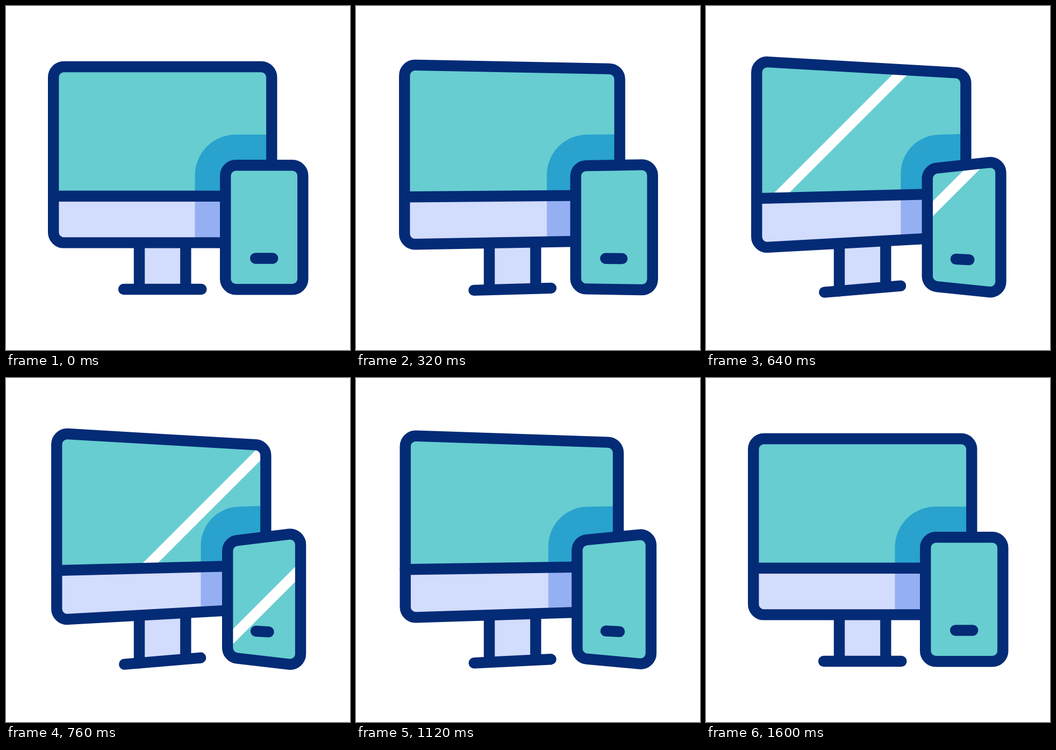
An HTML page with a canvas for the animation above (1.76 s loop, 640x640 px).

```html
<!DOCTYPE html>
<html lang="en">
<head>
<meta charset="utf-8">
<title>Computer and phone</title>
<style>
  html, body { margin: 0; width: 100%; height: 100%; overflow: hidden; background: #fff; }
  canvas { display: block; }
</style>
</head>
<body>
<canvas id="stage" width="640" height="640"></canvas>
<script>
const ctx = document.getElementById('stage').getContext('2d');
const LOOP = 1760, STEP = 40, RADIUS = 19.5;
const NAVY = '#042b76', TEAL = '#67cdd1', BLUE = '#29a2ce';
const LAVENDER = '#d2dcfd', SHADE = '#94b0f3';

const smooth = (t, start, length) => {
  const u = Math.min(1, Math.max(0, (t - start) / length));
  return u * u * (3 - 2 * u);
};

// Fake perspective: squeeze x towards a pivot, then scale heights linearly along x.
const turner = (k, { pivot, squeeze, axisX, axisY, tilt }) => (x, y) => {
  const tx = x + (pivot - x) * squeeze * k;
  return [tx, y + (y - axisY) * (tx - axisX) * tilt * k];
};

function polygon(...points) {
  const path = new Path2D();
  points.forEach(p => path.lineTo(...p));
  path.closePath();
  return path;
}

function rounded(corners) {
  const path = new Path2D();
  const [a, b] = corners;
  path.moveTo((a[0] + b[0]) / 2, (a[1] + b[1]) / 2);
  for (let i = 1; i <= 4; i++) path.arcTo(...corners[i % 4], ...corners[(i + 1) % 4], RADIUS);
  path.closePath();
  return path;
}

const box = (turn, left, top, right, bottom) =>
  [turn(left, top), turn(right, top), turn(right, bottom), turn(left, bottom)];

function fill(path, color) {
  ctx.fillStyle = color;
  ctx.fill(path);
}

function line(from, to) {
  ctx.beginPath();
  ctx.moveTo(...from);
  ctx.lineTo(...to);
  ctx.stroke();
}

// Diagonal white band whose left edge satisfies x + y = sum.
function shine(sum) {
  fill(polygon([sum, 0], [sum + 28, 0], [sum - 612, 640], [sum - 640, 640]), '#fff');
}

function drawStand(k) {
  const turn = turner(k, { pivot: 0, squeeze: 0, axisX: 286, axisY: 281, tilt: -.000345 });
  const left = 248, right = 334.3, top = 440, floor = 527, reach = 29 - 1.2 * k;
  fill(polygon(...box(turn, left, top, right, floor)), LAVENDER);
  for (const x of [left, right]) line([x, top], turn(x, floor));
  line(turn(left - reach, floor), turn(right + reach, floor));
}

function drawMonitor(k, t) {
  const turn = turner(k, { pivot: 233, squeeze: .042, axisX: 270, axisY: 281, tilt: -.000345 });
  const left = 88.2, right = 494.3, top = 113, bar = 353.7, bottom = 440.4;
  const outline = rounded(box(turn, left, top, right, bottom));
  const shadowX = 351.5 + 11 * k, shadowY = 239.3;

  ctx.save();
  ctx.clip(outline);
  fill(outline, LAVENDER);
  ctx.fillStyle = SHADE;
  ctx.fillRect(shadowX, shadowY, 200, 220);

  ctx.clip(polygon(...box(turn, left, top, right, bar)));
  fill(outline, TEAL);
  const shadow = new Path2D();
  shadow.moveTo(shadowX, 450);
  shadow.arcTo(shadowX, shadowY + 2.5 * k, right, shadowY - 1.8 * k, 76 - 4 * k);
  shadow.lineTo(right, shadowY - 1.8 * k);
  shadow.lineTo(right, 450);
  fill(shadow, BLUE);
  shine(474.5 + (t - 640) * 1.035);
  ctx.restore();

  ctx.stroke(outline);
  line(turn(left, bar), turn(right, bar));
}

function drawPhone(k, t) {
  const turn = turner(k, { pivot: 478, squeeze: .057, axisX: 479, axisY: 414.5, tilt: .001024 });
  const outline = rounded(box(turn, 408.2, 296.3, 552.3, 527.2));
  ctx.save();
  ctx.clip(outline);
  fill(outline, TEAL);
  shine(785 + (t - 640) * .868);
  ctx.restore();
  ctx.stroke(outline);
  const buttonY = 469.5 + 2.3 * k;
  line(turn(464.2, buttonY), turn(496.2 - 7 * k, buttonY));
}

function draw(now) {
  const t = Math.floor(now % LOOP / STEP) * STEP;
  const monitor = smooth(t, 100, 570) - smooth(t, 850, 600);
  const phone = smooth(t, 190, 560) - smooth(t, 965, 535);

  ctx.fillStyle = '#fff';
  ctx.fillRect(0, 0, 640, 640);
  ctx.strokeStyle = NAVY;
  ctx.lineWidth = 20.4;
  ctx.lineCap = 'round';
  drawStand(monitor);
  drawMonitor(monitor, t);
  drawPhone(phone, t);
}

const start = performance.now();
function tick() {
  draw(performance.now() - start);
  requestAnimationFrame(tick);
}
tick();
</script>
</body>
</html>
```
